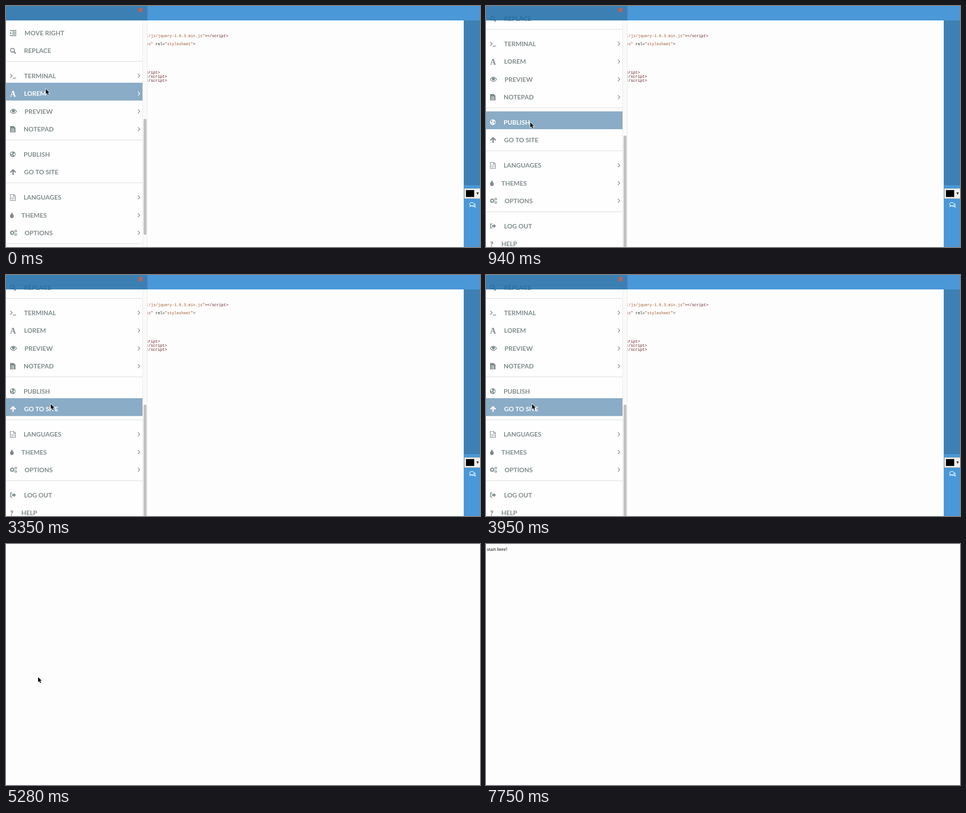
An HTML page with a canvas that plays this animation: 1049x534 px, repeating every 8.25 s.

```html
<!DOCTYPE html>
<html lang="en">
<head>
<meta charset="utf-8">
<title>Editor menu</title>
<style>
html, body { margin: 0; width: 100%; height: 100%; overflow: hidden; background: #fdfdfd; }
canvas { display: block; }
</style>
</head>
<body>
<canvas id="stage" width="1049" height="534"></canvas>
<script>
const ctx = document.getElementById('stage').getContext('2d');
const LOOP = 8250, PAGE_AT = 5280, TEXT_AT = 5880;
const GREY = '#7f8c8d', LIT = '#8aacc6', PAPER = '#fdfdfd', BLUE = '#4a98d8', DEEP = '#3d80b3';
const FIRST = 59.5, PITCH = 39.45, GAP = 16.25, SCROLL = 71;

// Menu groups: label, text x, icon, has submenu
const groups = [
  [['MOVE RIGHT', 41, indent], ['REPLACE', 40, search]],
  [['TERMINAL', 40, prompt, 1], ['LOREM', 40, letter, 1], ['PREVIEW', 41, eye, 1], ['NOTEPAD', 39, note, 1]],
  [['PUBLISH', 39, globe], ['GO TO SITE', 40, arrowUp]],
  [['LANGUAGES', 39, codeFile, 1], ['THEMES', 34, drop, 1], ['OPTIONS', 41, cogs, 1]],
  [['LOG OUT', 40, logOut], ['HELP', 34, question]]
];

const linear = u => u;
const smooth = u => u * u * u * (u * (6 * u - 15) + 10);

// Each move bows sideways from the last stop to the next one
const start = [88, 184];
const moves = [
  { from: 630, to: 940, steps: 6, end: [98, 258], bow: [0, 0], ease: linear },
  { from: 1770, to: 2030, steps: 8, end: [99, 290], bow: [0, 0], ease: linear },
  { from: 3350, to: 4010, steps: 18, end: [102, 295], bow: [0, -24], ease: linear },
  { from: 4610, to: 4900, steps: 8, end: [71, 295], bow: [-14, 0], ease: linear },
  { from: 6930, to: 7380, steps: 10, end: [728, 224], bow: [-240, -107], ease: smooth },
  { from: 7580, to: 7750, steps: 4, end: [968, 546], bow: [0, 0], ease: linear }
];

function pointerAt(t) {
  let pos = start;
  for (const m of moves) {
    if (t < m.from) break;
    const k = Math.floor((t - m.from) / (m.to - m.from) * (m.steps - 1) + 1e-6);
    const u = m.ease(Math.min(1, (k + 1) / m.steps));
    const a = pos;
    pos = m.end.map((b, i) => a[i] + (b - a[i]) * u + m.bow[i] * Math.sin(Math.PI * u));
  }
  return pos.map(Math.round);
}

function box(x, y, w, h, color) {
  if (color) ctx.fillStyle = color;
  ctx.fillRect(x, y, w, h);
}
function trace(pts, close) {
  ctx.beginPath();
  pts.forEach(([x, y]) => ctx.lineTo(x, y));
  if (close) ctx.closePath();
}
function line(pts, width) {
  ctx.lineWidth = width;
  trace(pts);
  ctx.stroke();
}
function poly(pts) {
  trace(pts, true);
  ctx.fill();
}
function oval(x, y, rx, ry = rx) {
  ctx.beginPath();
  ctx.ellipse(x, y, rx, ry, 0, 0, 7);
}
function disc(x, y, rx, ry) {
  oval(x, y, rx, ry);
  ctx.fill();
}
function ring(x, y, r, width) {
  ctx.lineWidth = width;
  oval(x, y, r);
  ctx.stroke();
}
// Angle mark: tip at x, arms reaching back by w and out by h
function angle(x, y, w, h, width) {
  line([[x - w, y - h], [x, y], [x - w, y + h]], width);
}
function text(str, x, y, font, color) {
  ctx.font = font;
  if (color) ctx.fillStyle = color;
  ctx.fillText(str, x, y);
}

// Icons: y is relative to the row, bg is the row colour
function indent() {
  for (let i = 0; i < 4; i++) {
    const x = i % 3 ? 14 : 9;
    box(x, -6 + i * 3.7, 23 - x, 2);
  }
  poly([[9, -2.5], [12.5, .5], [9, 3.5]]);
}
function search() {
  ring(14.3, -1, 4.3, 2);
  line([[17.5, 2.3], [21.5, 6.3]], 2.6);
}
function prompt() {
  angle(13.7, .2, 4.2, 4.2, 1.5);
  box(15, 4.5, 7.5, 1.5);
}
function letter() {
  text('A', 9, 6.5, 'bold 18px "Liberation Serif", serif');
}
function eye() {
  ctx.lineWidth = 1.4;
  ctx.beginPath();
  ctx.moveTo(9.3, 0);
  ctx.quadraticCurveTo(16.3, -9.6, 23.3, 0);
  ctx.quadraticCurveTo(16.3, 9.6, 9.3, 0);
  ctx.stroke();
  disc(16.3, -.7, 3.3);
}
function note(bg) {
  poly([[9, -7], [17, -7], [21, -3], [21, 7], [9, 7]]);
  for (const y of [-1, 1.6, 4.2]) box(11.5, y, 7, 1, bg);
  line([[16.5, -7], [16.5, -3], [21, -3]], .6);
}
function globe(bg) {
  disc(15, 0, 6.2);
  ctx.fillStyle = bg;
  disc(12.6, -2, 1.8, 2.6);
  disc(13.5, 3, 1, 1.8);
  disc(18.2, .2, 1.6, 2.8);
}
function arrowUp() {
  line([[10, .6], [15.7, -5], [21.4, .6]], 2.8);
  box(14.3, -4, 2.8, 10.3);
}
function codeFile() {
  ctx.lineWidth = 1.2;
  trace([[9.6, -6.5], [17, -6.5], [21, -2.7], [21, 6.7], [9.6, 6.7]], true);
  ctx.stroke();
  line([[16.6, -6.5], [16.6, -2.5], [21, -2.5]], 1);
  angle(11.5, 1.7, -1.7, 2.3, 1);
  angle(19.1, 1.7, 1.7, 2.3, 1);
  line([[16, -1], [14.6, 4.6]], 1);
}
function drop() {
  disc(13, 2.2, 4.2);
  poly([[13, -6.5], [16.6, .2], [9.4, .2]]);
}
function gear(x, y, r, width) {
  ring(x, y, r * .65, width);
  for (let i = 0; i < 8; i++) {
    const c = Math.cos(i * Math.PI / 4) * r, s = Math.sin(i * Math.PI / 4) * r;
    line([[x + c * .7, y + s * .7], [x + c, y + s]], r * .38);
  }
}
function cogs() {
  gear(13.7, 0, 5, 2.2);
  gear(21.6, -3.8, 2.8, 1.2);
  gear(21.6, 4, 2.8, 1.2);
}
function logOut() {
  line([[14, -4.6], [10.2, -4.6], [10.2, 4.6], [14, 4.6]], 1.8);
  box(13, -1.8, 5, 3.6);
  poly([[17, -4.8], [22, 0], [17, 4.8]]);
}
function question() {
  text('?', 9, 5.6, '900 15.5px Lato, sans-serif');
}

// Code is set from its right edge; parts alternate text and colour
function code(right, y, ...parts) {
  for (let i = parts.length - 2; i >= 0; i -= 2) {
    right -= parts[i].length * 5.19;
    text(parts[i], right, y, '8.65px "Liberation Mono", monospace', parts[i + 1]);
  }
}

function editor() {
  const tag = '#641c1c', str = '#a4562e', end = '<\/script>';
  code(492, 69, 't/js/jquery-1.8.3.min.js"', str, '>' + end, tag);
  code(419, 87, 'ss"', str, ' rel=', '#222', '"stylesheet"', str, '>', tag);
  code(341, 149.5, end, tag);
  code(356.5, 158.5, end, tag);
  code(356.5, 167.5, end, tag);

  box(313, 0, 736, 32, BLUE);
  box(1013, 32, 36, 365, DEEP);
  box(1013, 397, 36, 137, BLUE);
  box(1014, 404, 35, 23, '#b9b9b9');
  box(1015, 405, 34, 21, '#eeeeee');
  box(1017, 407, 20, 17, '#cfcfcf');
  box(1018, 408, 18, 15, '#000');
  ctx.fillStyle = '#333';
  poly([[1041, 413], [1046.5, 413], [1043.7, 418.5]]);
  chat();
}

function chat() {
  ctx.strokeStyle = '#fff';
  ctx.lineWidth = 1.2;
  oval(1031, 439, 5, 3.6);
  ctx.stroke();
  line([[1028, 442], [1026.6, 444.3], [1030.5, 442.6]], 1.2);
  ctx.beginPath();
  ctx.ellipse(1033.3, 440.5, 5.2, 3.8, 0, -.7, 1.9);
  ctx.stroke();
  line([[1036, 443.6], [1038.6, 445.6], [1037.4, 442.6]], 1.2);
}

function row([label, x, icon, sub], y, py) {
  const top = y - 24;
  const lit = py >= top && py < top + 39.5;
  if (lit) box(0, top, 302, 39.5, LIT);
  const ink = lit ? '#fff' : GREY;
  ctx.strokeStyle = ink;
  text(label, x, y + 5, 'bold 14px Lato, sans-serif', ink);
  ctx.save();
  ctx.translate(0, y);
  icon(lit ? LIT : '#fefefe');
  ctx.restore();
  if (sub) angle(296, y, 4, 4.3, 1.4);
}

function sidebar(scroll, py) {
  box(0, 0, 313, 534, '#fefefe');
  let y = FIRST - scroll;
  for (const group of groups) {
    for (const item of group) {
      row(item, Math.round(y * 2) / 2, py);
      y += PITCH;
    }
    box(0, Math.round(y - 16.3), 302, 1.5, '#e2e5e6');
    y += GAP;
  }
  box(302, 32, 11, 502, '#fafafa');
  box(302, 32, 1, 502, '#e7e7e7');
  box(312, 32, 1, 502, '#e9e9e9');
  ctx.fillStyle = '#c1c1c1';
  ctx.beginPath();
  ctx.roundRect(304.5, 250 + Math.floor(scroll * 37 / SCROLL), 6.5, 257, 3.2);
  ctx.fill();

  // Slightly see-through header
  box(0, 0, 313, 32, 'rgba(27,106,166,.85)');
  ctx.strokeStyle = '#e2583e';
  line([[293.8, 4.8], [302.2, 13.2]], 3);
  line([[302.2, 4.8], [293.8, 13.2]], 3);
}

function pointer(x, y) {
  ctx.save();
  ctx.translate(x, y);
  trace([[0, 0], [0, 11], [2.6, 8.7], [4.6, 13], [6.5, 12.2], [4.6, 8], [8, 8]], true);
  ctx.strokeStyle = '#fff';
  ctx.lineWidth = 1.6;
  ctx.stroke();
  ctx.fillStyle = '#000';
  ctx.fill();
  ctx.restore();
}

function draw(t) {
  const [px, py] = pointerAt(t);
  box(0, 0, 1049, 534, PAPER);
  if (t < PAGE_AT) {
    editor();
    sidebar(t < 60 ? 0 : t < 330 ? 1 : SCROLL, py);
  } else if (t >= TEXT_AT) {
    text('start here!', 2, 15, '11.4px "Liberation Serif", serif', '#000');
  }
  pointer(px, py);
}

function tick() {
  draw(performance.now() % LOOP);
  requestAnimationFrame(tick);
}
tick();
</script>
</body>
</html>
```
